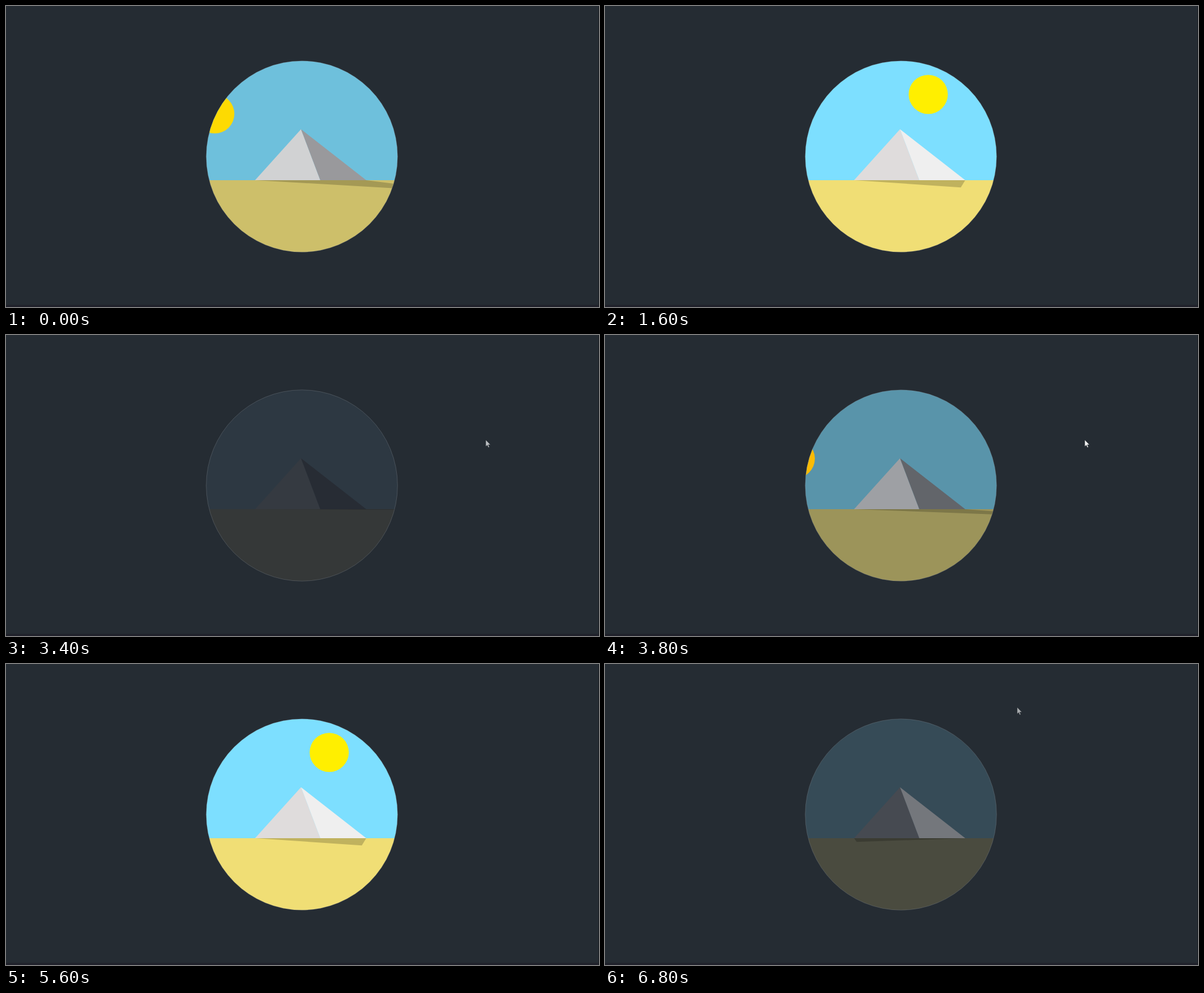
An HTML page for the animation above (6900 ms loop, 1000 by 508 pixels).

```html
<!DOCTYPE html>
<html lang="en">
<head>
<meta charset="utf-8">
<title>Pyramid day</title>
<style>
  html, body { margin: 0; width: 100%; height: 100%; overflow: hidden; background: #252c33; }
  svg { display: block; width: 100vw; height: 100vh; }
</style>
</head>
<body>
<svg viewBox="0 0 1000 508" preserveAspectRatio="none">
  <defs>
    <clipPath id="disc"><circle cx="499" cy="254" r="161.3"/></clipPath>
  </defs>
  <rect width="1000" height="508" fill="#252c33"/>
  <rect y="504.5" width="1000" height="3.5" fill="#20212b"/>
  <rect x="999" width="1" height="508" fill="#171b20"/>
  <g clip-path="url(#disc)">
    <rect id="sky" x="337" y="92" width="324" height="203"/>
    <circle id="sun" r="33"/>
    <rect id="sand" x="337" y="294" width="324" height="123"/>
    <path id="shadow" fill="#000" fill-opacity=".2"/>
  </g>
  <path id="left" d="M420 294L497.5 208L530 294Z"/>
  <path id="right" d="M497.5 208L607.5 294H530Z"/>
  <circle cx="499" cy="254" r="161.3" fill="none" stroke="#98a2a6" stroke-opacity=".35" stroke-width=".8"/>
  <path id="cursor" d="M0 0V11.2L2.6 8.9L4.4 13L6.2 12.2L4.4 8.3H8Z" stroke="#1b2026" stroke-width=".5"/>
</svg>
<script>
const LOOP = 6900, STEP = 100, DAY = 4000, DAY_OFFSET = 805;
const RIGHT_FACE_LAG = 170;
const NIGHT = [39, 44, 52];
const LIGHT = [244, 244, 244], SHADE = [221, 218, 218];
const BLUE = [125, 223, 255], SAND = [240, 222, 117];
const DUSK = [245, 114, 9], NOON = [255, 239, 0];

// Each track: [share of the day, values]
const tracks = {
  sky: [[0, NIGHT], [.3, BLUE], [.7, BLUE], [1, NIGHT]],
  sand: [[0, NIGHT], [.3, SAND], [.7, SAND], [1, NIGHT]],
  left: [[0, NIGHT], [.3, LIGHT], [.7, SHADE], [1, NIGHT]],
  right: [[0, NIGHT], [.3, SHADE], [.7, LIGHT], [1, NIGHT]],
  sun: [[0, DUSK], [.3, NOON], [.7, NOON], [1, DUSK]],
  angle: [[0, [-70]], [.3, [-28]], [1, [70]]],
  shadowTip: [[0, [870]], [.3, [750]], [1, [415]]],
  shadowScale: [[0, [0]], [.3, [1]], [.55, [.4]], [.75, [1]], [1, [0]]]
};

// Pointer: [from ms, x, y, fill]; without x it is hidden
const pointer = [
  [0], [3200, 809, 177, '#bcbfc2'], [3600, 809, 177, '#f2f2f2'],
  [4400, 865, 195, '#f2f2f2'], [4500, 931, 215, '#f2f2f2'], [4600],
  [6600, 759, 128, '#b4b7ba'], [6700, 718, 94, '#a8abae'], [6800, 695, 73, '#a8abae']
];

const el = id => document.getElementById(id);
const set = (id, attrs) => {
  for (const name in attrs) el(id).setAttribute(name, attrs[name]);
};
const rgb = values => `rgb(${values.map(Math.round)})`;

// cubic-bezier(.4, 0, .49, 1), solved by bisection
function ease(x) {
  let low = 0, high = 1;
  for (let i = 0; i < 24; i++) {
    const s = (low + high) / 2, r = 1 - s;
    if (1.2 * r * r * s + 1.47 * r * s * s + s * s * s < x) low = s;
    else high = s;
  }
  return low * low * (3 - 2 * low);
}

function sample(name, phase) {
  const track = tracks[name];
  const i = Math.max(1, track.findIndex(key => key[0] >= phase));
  const [start, from] = track[i - 1], [end, to] = track[i];
  const k = ease((phase - start) / (end - start));
  return from.map((v, n) => v + (to[n] - v) * k);
}

const dayPhase = ms => ((ms + DAY) % DAY) / DAY;

function draw(t) {
  const phase = dayPhase(t + DAY_OFFSET);
  for (const id of ['sky', 'sand', 'left', 'sun']) set(id, { fill: rgb(sample(id, phase)) });
  set('right', { fill: rgb(sample('right', dayPhase(t + DAY_OFFSET - RIGHT_FACE_LAG))) });

  const a = sample('angle', phase)[0] * Math.PI / 180;
  set('sun', { cx: 483 + 227 * Math.sin(a), cy: 367.5 - 227 * Math.cos(a) });

  const tipX = sample('shadowTip', phase)[0];
  const tipY = 294 + 24.5 * sample('shadowScale', phase)[0];
  set('shadow', { d: `M420 294H607.5L${tipX} ${tipY}Z` });

  const [, x, y, fill] = pointer.filter(p => p[0] <= t).pop();
  set('cursor', x === undefined
    ? { visibility: 'hidden' }
    : { visibility: 'visible', transform: `translate(${x} ${y})`, fill });
}

const begin = performance.now();
function tick() {
  const t = (performance.now() - begin + 20) % LOOP;
  draw(Math.floor(t / STEP) * STEP);
  requestAnimationFrame(tick);
}
tick();
</script>
</body>
</html>
```
